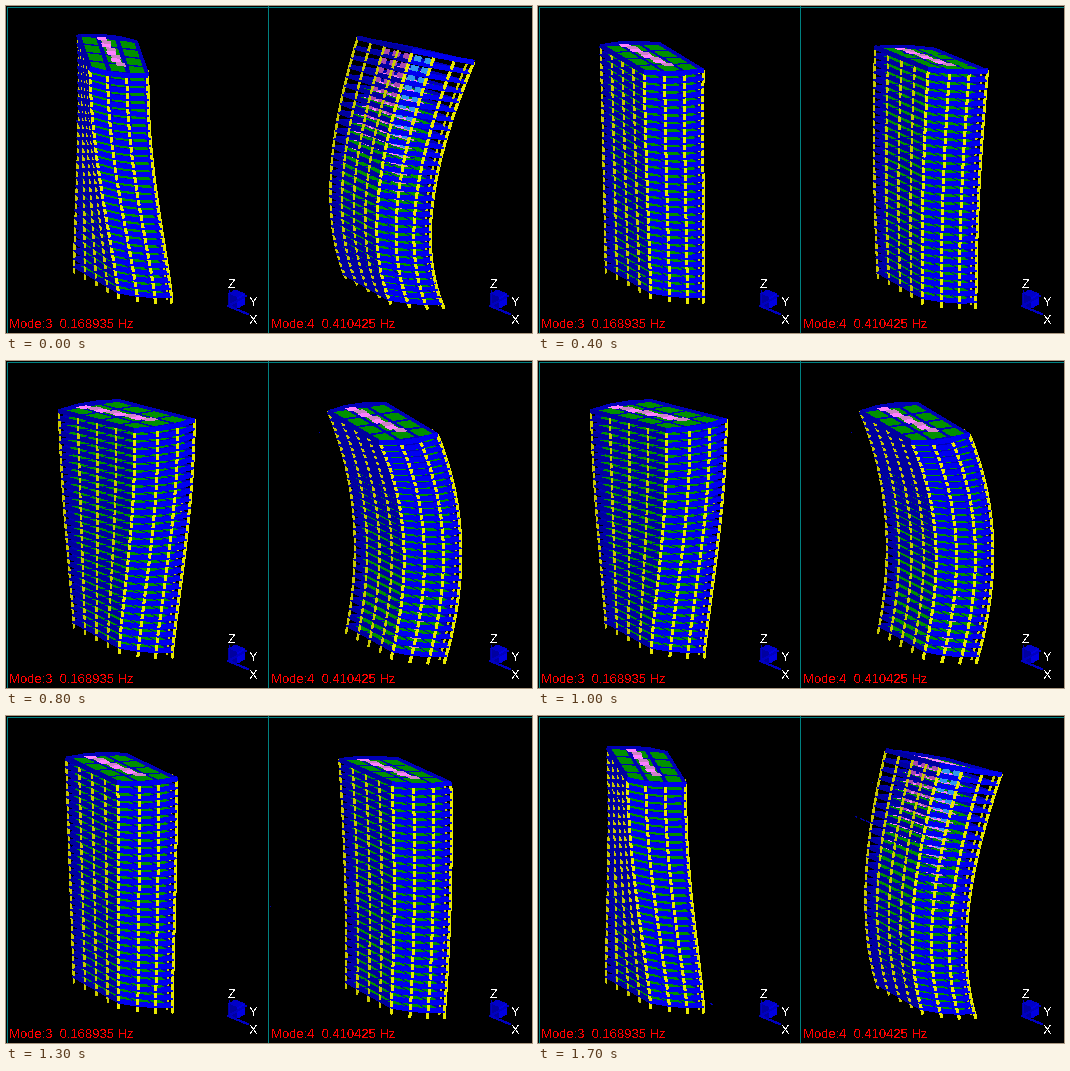
Recreate the animation shown at these times as a matplotlib script. Size 526 by 327 pixels, loop 1.8 s.

```python
import numpy as np
import matplotlib.pyplot as plt
from matplotlib.animation import FuncAnimation
from matplotlib.collections import PolyCollection

W, H = 526, 327
FRAMES, STEP = 18, 100
FLOORS = 30

BLUE, DEEP, NAVY = "#0000f0", "#0000b8", "#0000a0"
GREEN, YELLOW, OCHRE = "#009000", "#e8e800", "#c8c800"
PINK, ROSE, PLUM, CYAN = "#ff80ff", "#d080c8", "#a848b0", "#3098f0"
TEAL = "#008080"

plt.rcParams["text.antialiased"] = False
plt.rcParams["font.family"] = "Liberation Sans"


def px(n):
    return n * .72


def bulge(t):
    return t * (1 - t)


def opposite(points):
    return [(1 - u, 1 - v) for u, v in points]


# Plan: u runs along the long side, v along the bowed short front.
LEFT = [(i / 4, 0) for i in range(5)]
FRONT = [(1 + .36 * bulge(t), t - .2 * bulge(t)) for t in np.linspace(0, 1, 4)]
OUTLINE = LEFT + FRONT[1:] + opposite(LEFT)[1:] + opposite(FRONT)[1:-1]
REAR = OUTLINE[7:] + [(0, 0)]


def rect(u, v, du, dv):
    return [(u, v), (u + du, v), (u + du, v + dv), (u, v + dv)]


def build():
    """Parts of the tower in painter's order: points, fill, line, width."""
    parts = []

    def at(points, h):
        return [(u, v, h) for u, v in points]

    def face(points, color):
        parts.append((points, color, color, 0))

    def line(points, color, width):
        parts.append((points, "none", color, px(width)))

    def posts(points, low, high, color, width):
        for p in points:
            line(at([p], low) + at([p], high), color, width)

    def wall(u, v, low, high, color):
        ends = [(u, v), (u + .08, v + .03)]
        face(at(ends, low) + at(ends[::-1], high), color)

    for k in range(1, FLOORS + 1):
        low, h = (k - 1) / FLOORS, k / FLOORS
        posts([(.85, 1.04)], low, h, OCHRE, 1)
        if k > 1:
            for i in range(5):
                wall(.1 + .14 * i, .36 + .05 * i, low, low + .45 / FLOORS,
                     PLUM if i < 3 else CYAN)
        posts(LEFT[:-1], low, h, OCHRE, 1.4)
        posts(FRONT, low, h, YELLOW, 2)

        face(at(OUTLINE, h), DEEP)
        for i in range(4):
            for j in range(3):
                cell = rect((i + .15) / 4, (j + .15) / 3, .7 / 4, .7 / 3)
                face(at(cell, h), GREEN)
        for i in range(8):
            strip = rect(-.03 + .105 * i, .33 + .02 * i + .04 * (i % 2), .085, .14)
            face(at(strip, h), ROSE if i % 2 else PINK)
        line(at(REAR, h), DEEP, 2)
        line(at(LEFT, h), NAVY, 3.6)
        line(at(FRONT, h), BLUE, 4)
    return parts


def plane(uv, origin, along, across):
    return np.array(origin) + uv @ np.array([along, across])


def twist(h):
    return np.sin(np.pi * h / 2) ** 1.2


# Second bending shape: fixed at the ground, one crossing below the top.
bend = np.poly1d([0, .79], r=True) * np.poly1d([-.89, 5.65])
lean = np.poly1d([1, 0]) * bend.deriv() / bend.deriv()(1)


class Tower:
    def __init__(self, ax, parts, base, top, modes):
        points = np.array([p for part in parts for p in part[0]], float)
        self.cuts = np.cumsum([len(part[0]) for part in parts])[:-1]
        uv, h = points[:, :2], points[:, 2:]
        self.rest = (1 - h) * plane(uv, *base) + h * plane(uv, *top)
        self.shift = sum(shape(h) * plane(uv, *move) for shape, move in modes)
        _, fills, lines, widths = zip(*parts)
        self.art = PolyCollection(
            self.shapes(1), closed=False, antialiaseds=False, capstyle="butt",
            facecolors=fills, edgecolors=lines, linewidths=widths)
        ax.add_collection(self.art, autolim=False)

    def shapes(self, amount):
        return np.split(self.rest + amount * self.shift, self.cuts)

    def pose(self, amount):
        self.art.set_verts(self.shapes(amount), closed=False)


def path(ax, points, color):
    ax.plot(*zip(*points), color=color, lw=px(1), antialiased=False)


def write(ax, x, y, text, color="white"):
    ax.text(x, y, text, color=color, size=px(13), va="baseline")


def draw_triad(ax, x, y):
    for dx, dy in ((0, -16), (19, 8), (17, -10)):
        path(ax, [(x, y), (x + dx, y + dy)], "#0000c0")
    right, back, up = np.array([(9, 4), (7, -4), (0, -10)])
    corner = np.array([x, y - 2])
    sides = ((corner + up, right, back, "#0000c8"), (corner, right, up, "#0000a0"),
             (corner + right, back, up, "#0000e0"))
    for p, a, b, color in sides:
        ax.fill(*zip(p, p + a, p + a + b, p + b), color=color, lw=0, antialiased=False)
    write(ax, x - 1, y - 18, "Z")
    write(ax, x + 20, y, "Y")
    write(ax, x + 20, y + 18.5, "X")


fig = plt.figure(figsize=(W / 100, H / 100), dpi=100, facecolor="black")
ax = fig.add_axes([0, 0, 1, 1])
ax.set_xlim(0, W)
ax.set_ylim(H, 0)
ax.axis("off")

path(ax, [(.5, H), (.5, .5), (W, .5)], TEAL)
path(ax, [(261.5, 0), (261.5, H)], TEAL)
path(ax, [(0, H - .5), (W - .5, H - .5), (W - .5, 0)], "white")
for x, label in ((0, "Mode:3  0.168935 Hz"), (262, "Mode:4  0.410425 Hz")):
    write(ax, x + 3, 322, label, "#ff0000")
    draw_triad(ax, x + 222.5, 300)

# Each plane is an origin at the left corner, then the u and v directions.
parts = build()
along, across = (45, 25.5), (53, 4.5)
towers = [
    Tower(ax, parts,
          base=[(68, 267), along, across],
          top=[(61.5, 41), (47.5, 25.5), (59, -3)],
          modes=[(twist, [(10.9, -11.6), (-36, 8), (-1, 9.5)])]),
    Tower(ax, parts,
          base=[(340, 272.5), along, across],
          top=[(335.2, 42.5), (53, 23), (59, .5)],
          modes=[(bend, [(16.5, -10.2), (2, 0), (2, 0)]),
                 (lean, [(0, -.5), (0, -10), (0, 11)])]),
]


def update(n):
    amount = 2 * abs(1 - 2 * n / FRAMES) - 1
    for tower in towers:
        tower.pose(amount)
    return [tower.art for tower in towers]


anim = FuncAnimation(fig, update, frames=FRAMES, interval=STEP, repeat=True,
                     repeat_delay=0, blit=False)
plt.show()
```
